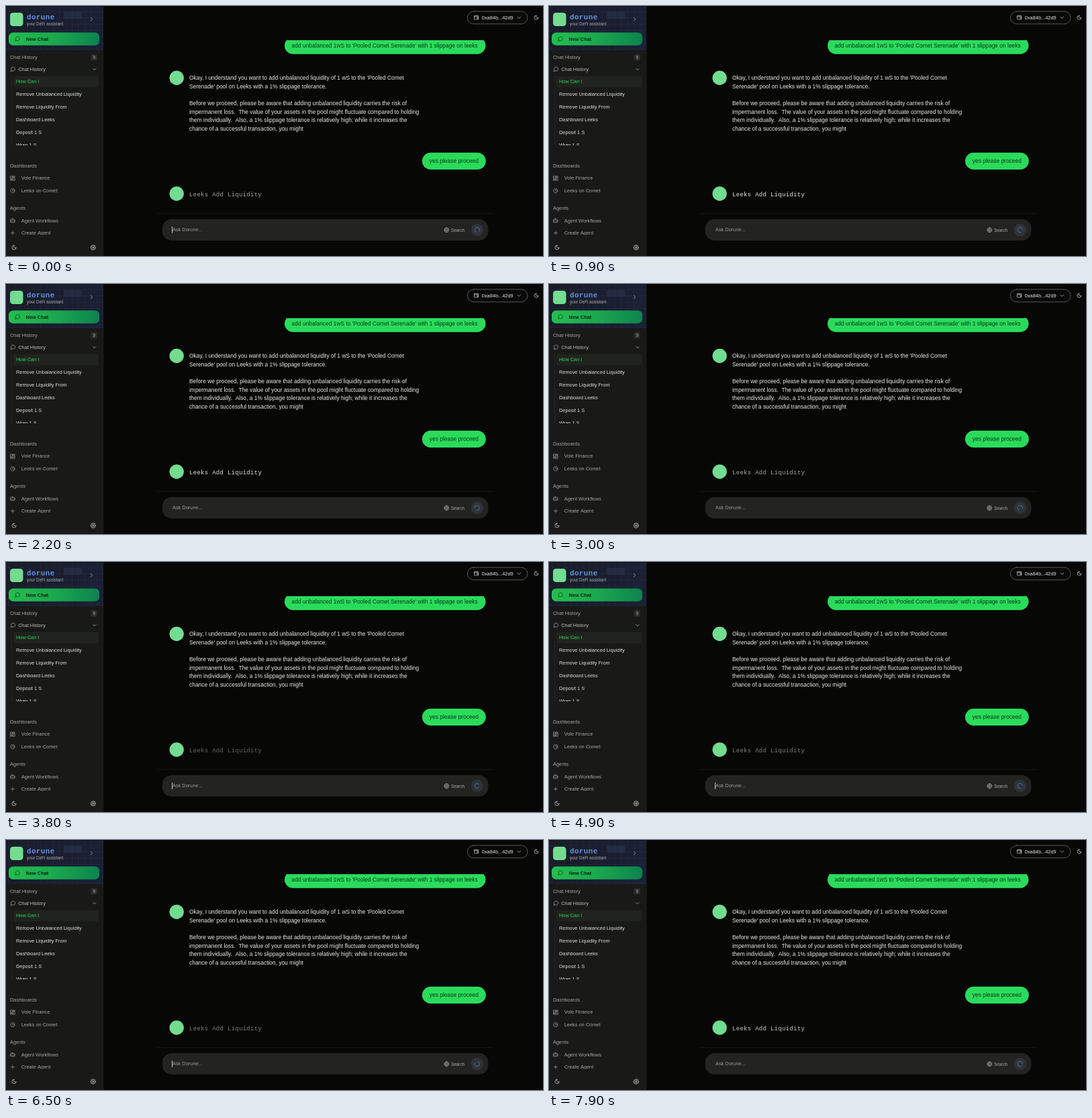
These frames come from a looping animation (800x373 px, 8 s). An HTML page with a canvas:

```html
<!DOCTYPE html>
<html lang="en">
<head>
<meta charset="utf-8">
<title>Chat assistant</title>
<style>
  html, body { margin: 0; width: 100%; height: 100%; overflow: hidden; background: #070706; }
  canvas { display: block; width: 800px; height: 373px; }
</style>
</head>
<body>
<canvas id="stage"></canvas>
<script>
const W = 800, H = 373, LOOP = 8000, STEP = 100, TAU = Math.PI * 2;
const PULSE = 1200, SPIN = 1000;
const SANS = '"Liberation Sans", Arial, sans-serif';
const MONO = '"Liberation Mono", "Courier New", monospace';
const GREEN = '#2adb5b', MINT = '#72dc90';
const stage = document.getElementById('stage');
const ratio = window.devicePixelRatio || 1;
stage.width = W * ratio;
stage.height = H * ratio;
const c = stage.getContext('2d');
c.scale(ratio, ratio);

function text(str, x, y, size, color, { font = SANS, weight = '', spacing = 0 } = {}) {
  c.font = `${weight} ${size}px ${font}`;
  c.letterSpacing = spacing + 'px';
  c.fillStyle = color;
  c.fillText(str, x, y);
}

function rect(x, y, w, h, color) {
  c.fillStyle = color;
  c.fillRect(x, y, w, h);
}

function round(x, y, w, h, r, fill, stroke) {
  c.beginPath();
  c.roundRect(x, y, w, h, r);
  if (fill) { c.fillStyle = fill; c.fill(); }
  if (stroke) { c.strokeStyle = stroke; c.lineWidth = 0.8; c.stroke(); }
}

function disc(x, y, r, color) {
  c.beginPath();
  c.arc(x, y, r, 0, TAU);
  c.fillStyle = color;
  c.fill();
}

// Line icons use a 24-unit grid centred on x, y.
function icon(d, x, y, size, color, width = 2) {
  c.save();
  c.translate(x - size / 2, y - size / 2);
  c.scale(size / 24, size / 24);
  c.strokeStyle = color;
  c.lineWidth = width;
  c.lineCap = c.lineJoin = 'round';
  c.stroke(new Path2D(d));
  c.restore();
}

function clipped(x, y, w, h, draw) {
  c.save();
  c.beginPath();
  c.rect(x, y, w, h);
  c.clip();
  draw();
  c.restore();
}

const ICONS = {
  right: 'M9 5l7 7-7 7',
  down: 'M5 9l7 7 7-7',
  chat: 'M4 21l1.6-5A9 9 0 1 1 9 19.6Z',
  moon: 'M12 3a6 6 0 0 0 9 9 9 9 0 1 1-9-9Z',
  grid: 'M3 3h7v9H3ZM14 3h7v5h-7ZM14 12h7v9h-7ZM3 16h7v5H3Z',
  pie: 'M21 12A9 9 0 0 0 12 3v9ZM21 15.5A9.6 9.6 0 1 1 8 3',
  bot: 'M12 8V4H8M4 8h16v12H4ZM1 14h3M20 14h3M9 13v2M15 13v2',
  plus: 'M4 12h16M12 4v16',
  wallet: 'M20 7V4H5a2 2 0 0 0 0 4h16v12H5a2 2 0 0 1-2-2V6M21 12h-4a2 2 0 0 0 0 4h4',
  globe: 'M2 12a10 10 0 1 0 20 0 10 10 0 1 0-20 0M2 12h20M12 2c5 5 5 15 0 20M12 2c-5 5-5 15 0 20'
};

// Cog outline: a rim whose radius swells at eight teeth.
function gear(x, y) {
  c.strokeStyle = '#d8d8d8';
  c.lineWidth = 0.8;
  c.beginPath();
  for (let i = 0; i <= 64; i++) {
    const a = i * TAU / 64;
    const r = 3.3 + 0.5 * Math.tanh(3 * Math.cos(8 * a));
    c.lineTo(x + r * Math.cos(a), y + r * Math.sin(a));
  }
  c.moveTo(x + 1.2, y);
  c.arc(x, y, 1.2, 0, TAU);
  c.stroke();
}

function sidebarHeader() {
  const bg = c.createLinearGradient(0, 0, 145, 0);
  bg.addColorStop(0, '#191b26');
  bg.addColorStop(1, '#1b2035');
  rect(0, 0, 145, 66, bg);
  for (let x = 4; x < 145; x += 9.4) rect(x, 0, 0.7, 66, 'rgba(72,88,132,.2)');
  for (let y = 8; y < 66; y += 9.4) rect(0, y, 145, 0.7, 'rgba(72,88,132,.2)');
  rect(86, 9, 27, 10, 'rgba(58,70,105,.3)');
  rect(0, 0, 145, 1, '#11131b');

  round(6, 10, 19.5, 20, 4.5, MINT);
  text('dorune', 31, 20, 10.8, '#6292e4', { font: MONO, weight: 'bold', spacing: 0.45 });
  text('your DeFi assistant', 31, 29.2, 6.35, '#a3a6ac');
  icon(ICONS.right, 127.5, 19.7, 8, '#d5d7dc');

  const btn = c.createLinearGradient(4, 0, 139, 0);
  btn.addColorStop(0, '#25bd50');
  btn.addColorStop(0.5, '#1ca84e');
  btn.addColorStop(1, '#0c834f');
  round(4, 39.5, 135, 19.2, 6.5, btn);
  icon(ICONS.chat, 16.7, 49, 8.2, '#0a2d18');
  text('New Chat', 29.6, 51.7, 7.4, '#092814', { weight: 'bold' });
}

function sidebar() {
  rect(0, 0, 145, H, '#191917');
  sidebarHeader();

  const grey = '#a5a5a2', light = '#dededb';
  text('Chat History', 6, 78.9, 7.4, grey);
  round(126.5, 71.5, 9.5, 10, 2, '#2b2b29');
  text('9', 129.6, 78.8, 6.3, '#b4b4b1');
  icon(ICONS.chat, 10, 94.2, 8.2, '#b4b4b1');
  text('Chat History', 18.2, 96.7, 7.4, '#bcbcb8');
  icon(ICONS.down, 131.8, 94.2, 8, '#c4c4c0');

  rect(8, 103, 0.7, 105, '#2d2d2a');
  round(11, 104.5, 127, 17, 3, '#21231f');
  clipped(0, 100, 145, 108, () => {
    ['How Can I', 'Remove Unbalanced Liquidity', 'Remove Liquidity From',
      'Dashboard Leeks', 'Deposit 1 S', 'Wrap 1 S'].forEach((label, i) =>
      text(label, 15, 115.4 + i * 18.85, 7.36, i ? light : GREEN));
  });

  text('Dashboards', 6, 241.3, 7.4, grey);
  icon(ICONS.grid, 10, 257, 8.4, grey);
  text('Vole Finance', 22.7, 259.3, 7.4, grey);
  icon(ICONS.pie, 10, 275.6, 8.4, grey);
  text('Leeks on Comet', 22.7, 278.1, 7.4, grey);
  text('Agents', 6, 304.4, 7.4, grey);
  icon(ICONS.bot, 10, 320, 8.4, grey);
  text('Agent Workflows', 22.7, 322.5, 7.4, grey);
  clipped(0, 330, 145, 12, () => {
    icon(ICONS.plus, 10, 338.7, 8, grey);
    text('Create Agent', 22.7, 341.3, 7.4, grey);
  });

  icon(ICONS.moon, 12, 360.3, 8.4, '#d8d8d8');
  gear(129.8, 360.4);
  rect(144.5, 0, 0.7, H, '#242421');
}

function conversation() {
  const ink = '#0a3818', pale = '#e9e9e9';
  clipped(145, 51, 655, 30, () => round(415, 46.5, 299.5, 25.2, 12.6, GREEN));
  text("add unbalanced 1wS to 'Pooled Comet Serenade' with 1 slippage on leeks", 425.6, 62, 8.42, ink);

  disc(254.2, 107.2, 10.7, MINT);
  ["Okay, I understand you want to add unbalanced liquidity of 1 wS to the 'Pooled Comet",
    "Serenade' pool on Leeks with a 1% slippage tolerance.",
    '',
    'Before we proceed, please be aware that adding unbalanced liquidity carries the risk of',
    'impermanent loss.  The value of your assets in the pool might fluctuate compared to holding',
    'them individually.  Also, a 1% slippage tolerance is relatively high; while it increases the',
    'chance of a successful transaction, you might'
  ].forEach((line, i) => text(line, 273, 110.1 + i * 12.67, 8.44, pale));

  round(620, 218.8, 94.8, 25.2, 12.6, GREEN);
  text('yes please proceed', 630.8, 234.4, 8.44, ink);
  disc(254.2, 280, 10.7, MINT);
}

function wallet() {
  round(687.4, 8, 89.6, 18.8, 9.4, '#090909', '#6c6c6a');
  icon(ICONS.wallet, 700.6, 17.2, 8.2, '#dedede');
  text('0xa84b...42d9', 708.8, 19.8, 7.4, '#e6e6e6');
  icon(ICONS.down, 764.3, 17.2, 8, '#dedede');
  icon(ICONS.moon, 790, 17.2, 8, '#dedede');
}

// Eases from dim (0.3 s) to bright (0.9 s) and back.
function glow(t) {
  const phase = (t + PULSE - 300) % PULSE / (PULSE / 2);
  const p = phase < 1 ? phase : 2 - phase;
  return p * p * p * (p * (6 * p - 15) + 10);
}

function spinner(x, y, t) {
  disc(x, y, 9.2, '#2e3339');
  const gap = (0.2 + t / SPIN) * TAU, half = TAU / 10;
  c.beginPath();
  c.arc(x, y, 3.6, gap + half, gap + TAU - half);
  c.strokeStyle = '#5b7aa8';
  c.lineWidth = 0.9;
  c.lineCap = 'round';
  c.stroke();
}

function composer(t) {
  rect(225, 309, 501, 0.8, '#191919');
  round(233.3, 318.7, 484.6, 30.6, 12.7, '#232322', '#2b2b2a');
  text('Ask Dorune...', 248, 336.4, 7.4, '#9c9c9a');
  if ((t + 50) % PULSE < PULSE / 2) rect(247.2, 329, 0.9, 10, '#e2e2e2');

  icon(ICONS.globe, 656.3, 334.2, 8.2, '#b3b3b1');
  text('Search', 663, 336.5, 6.35, '#aaaaa8');
  spinner(701.8, 334, t);
}

function draw(t) {
  rect(0, 0, W, H, '#070706');
  sidebar();
  wallet();
  conversation();
  const v = Math.round(98 + 132 * glow(t));
  text('Leeks Add Liquidity', 273, 284.4, 9, `rgb(${v},${v},${v})`, { font: MONO, spacing: 0.29 });
  composer(t);
}

const start = performance.now();
function tick() {
  // The small lead keeps late clock ticks on their own step.
  const t = (performance.now() - start + 20) % LOOP;
  draw(Math.floor(t / STEP) * STEP);
  requestAnimationFrame(tick);
}
tick();
</script>
</body>
</html>
```
